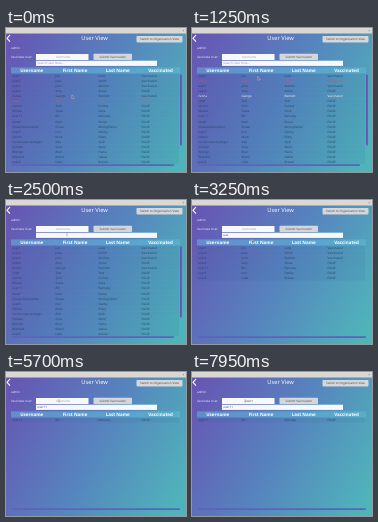
These frames come from a looping animation (180 by 144 pixels, 8 s). An HTML page with a canvas:

```html
<!DOCTYPE html>
<html lang="en">
<head>
<meta charset="utf-8">
<title>User View</title>
<style>
  html, body { margin: 0; width: 100%; height: 100%; overflow: hidden; }
  canvas { display: block; width: 100vw; height: 100vh; }
</style>
</head>
<body>
<canvas id="stage"></canvas>
<script>
const W = 180, H = 144, LOOP = 8000;
const PITCH = 5.06, FIRST_ROW = 48, SELECTED = 4, PAGE = 18;
const COLUMNS = [6.5, 49.5, 92.5, 135.5];
const INK = '#28405f', BUTTON = '#d4d6d9', FIELD = '#f7f8fa';
const SELECT_TIME = 400, FOCUS_TIME = 2250;

const canvas = document.getElementById('stage');
const ctx = canvas.getContext('2d');

const vaccinated = ['user1', 'user2', 'user3', 'Fenna'];
const users = [
  'user1 Joe Lane', 'user2 Jane Smith', 'user3 John Marlow', 'user4 Amy Stone',
  'Fenna George Bennett', 'chief Test Test', 'staria1 Tom Farrow', 'Mira22 Tessa Vane',
  'user11 Bill Barnaby', 'tester Noel Reeve', 'ChasenUsername1 Chase Morleyfielder',
  'user5 Ivor Denby', 'Harlan Mark Ellery', 'su-not-user-testings1 Ada Quill',
  'Corwen Cora Weld', 'Bronlyn Bron Harte', 'Brandell Brand Oakes', 'user6 Luke Brewer'
].map(line => {
  const row = line.split(' ');
  return [...row, vaccinated.includes(row[0]) ? 'Vaccinated' : 'FALSE'];
});

// Pointer stops: time, x, y
const path = [
  [0, 66, 69], [200, 66, 69], [750, 68, 57], [1000, 68, 57], [1700, 61, 34.5],
  [2600, 61, 34.5], [3500, 60, 43], [4800, 60, 43], [5500, 53, 29], [8000, 53, 29]
];

function pointerAt(t) {
  const i = path.findIndex((p, n) => n > 0 && t <= p[0]);
  const [t0, x0, y0] = path[i - 1], [t1, x1, y1] = path[i];
  const u = (t - t0) / (t1 - t0), e = u * u * (3 - 2 * u);
  return { x: x0 + (x1 - x0) * e, y: y0 + (y1 - y0) * e };
}

// Returns the part of a word typed by time t.
function typed(word, start, step, t) {
  return word.slice(0, Math.max(0, Math.floor((t - start) / step) + 1));
}

function searchText(t) {
  return typed('user1', 2850, 170, t) + (t >= 4700 ? '1' : '');
}

function rect(x, y, w, h, fill) {
  ctx.fillStyle = fill;
  ctx.fillRect(x, y, w, h);
}

function pill(x, y, w, h, fill) {
  ctx.fillStyle = fill;
  ctx.beginPath();
  ctx.roundRect(x, y, w, h, 0.8);
  ctx.fill();
}

function line(points, color, width) {
  ctx.beginPath();
  points.forEach(([x, y]) => ctx.lineTo(x, y));
  ctx.strokeStyle = color;
  ctx.lineWidth = width;
  ctx.stroke();
}

function label(text, x, y, size = 3, fill = '#fff', align = 'left', weight = 400) {
  ctx.font = `${weight} ${size}px "Open Sans", sans-serif`;
  ctx.textAlign = align;
  ctx.fillStyle = fill;
  ctx.fillText(text, x, y);
}

function drawBackground() {
  const g = ctx.createLinearGradient(0, 25, 180, 119);
  g.addColorStop(0, '#6657b4');
  g.addColorStop(0.5, '#5684be');
  g.addColorStop(1, '#4fb4ba');
  rect(0, 0, W, H, g);
  rect(0, 0, W, 5.5, '#d9d8d5');
  label('×', 177.5, 2.8, 4, '#77736f', 'center');
}

function drawHeading() {
  line([[4, 7], [1, 10.3], [4, 13.6]], '#fff', 1.1);
  label('User View', 88.5, 10.4, 5.8, '#fff', 'center');
  pill(130.5, 8, 46, 6.4, BUTTON);
  label('Switch to Organisation View', 153.5, 11.3, 3, '#444', 'center');
  label('admin', 5, 20);
}

function drawForm(t) {
  label('Vaccinate User:', 5, 28.8);
  rect(30, 26, 52.5, 6, FIELD);
  const name = typed('user1', 7100, 170, t);
  label(name || 'Username', 57, 29, 3, name ? '#333' : '#9a9ca1', 'center');
  pill(87.5, 25.8, 38.5, 6.2, BUTTON);
  label('Submit Vaccination', 106.8, 29, 3, '#444', 'center');

  rect(30, 32.7, 121, 5.2, FIELD);
  const query = searchText(t);
  if (query) label(query, 31.3, 35.2, 3, '#444');
  else if (t < FOCUS_TIME) label('Search User Here...', 31.3, 35.2, 3, '#8f9197');
}

function drawTable(t, pointer) {
  const query = searchText(t);
  const rows = users.filter(row => row[0].startsWith(query));
  const hover = pointer.y > 46 ? Math.round((pointer.y + 5 - FIRST_ROW) / PITCH) : -1;
  const selected = !query && t > SELECT_TIME && t < FOCUS_TIME ? SELECTED : -1;

  rect(5, 39.4, 169, 6.2, 'rgba(96,190,222,.5)');
  ['Username', 'First Name', 'Last Name', 'Vaccinated'].forEach((name, i) =>
    label(name, [25.7, 69, 111.7, 154.5][i], 42.6, 4.5, '#fff', 'center', 700));

  rows.forEach((row, i) => {
    const y = FIRST_ROW + i * PITCH;
    rect(5, y - PITCH / 2, 168, PITCH - 0.3, 'rgba(40,75,145,.09)');
    const color = i === hover ? '#dc574e' : i === selected ? '#fff' : INK;
    row.forEach((cell, c) => label(cell, COLUMNS[c], y + 0.2, 3, color));
  });

  const scrolls = rows.length >= PAGE;
  if (scrolls) pill(174, 46.5, 1.8, 71, '#5f55b4');
  pill(6, 136.2, scrolls ? 162 : 168, 1.8, '#5f62b9');
}

function drawPointer({ x, y }) {
  const inField = x > 30 && y > 26 && y < 38;
  if (inField) {
    line([[x, y - 1.8], [x, y + 1.8]], '#777', 0.45);
    return;
  }
  ctx.beginPath();
  ctx.moveTo(x, y - 1.8);
  ctx.lineTo(x, y + 2);
  ctx.lineTo(x + 0.9, y + 1.2);
  ctx.lineTo(x + 2.3, y + 1.2);
  ctx.closePath();
  ctx.fillStyle = '#444';
  ctx.fill();
  ctx.strokeStyle = '#eee';
  ctx.lineWidth = 0.4;
  ctx.stroke();
}

function resize() {
  const dpr = window.devicePixelRatio || 1;
  canvas.width = Math.round(innerWidth * dpr);
  canvas.height = Math.round(innerHeight * dpr);
}

function draw(now) {
  const t = now % LOOP;
  const pointer = pointerAt(t);
  ctx.setTransform(canvas.width / W, 0, 0, canvas.height / H, 0, 0);
  ctx.textBaseline = 'middle';
  ctx.textRendering = 'geometricPrecision';
  drawBackground();
  drawHeading();
  drawForm(t);
  drawTable(t, pointer);
  drawPointer(pointer);
}

let start;
function tick(now) {
  start ??= now;
  draw(now - start);
  requestAnimationFrame(tick);
}

addEventListener('resize', resize);
resize();
draw(0);
requestAnimationFrame(tick);
</script>
</body>
</html>
```
